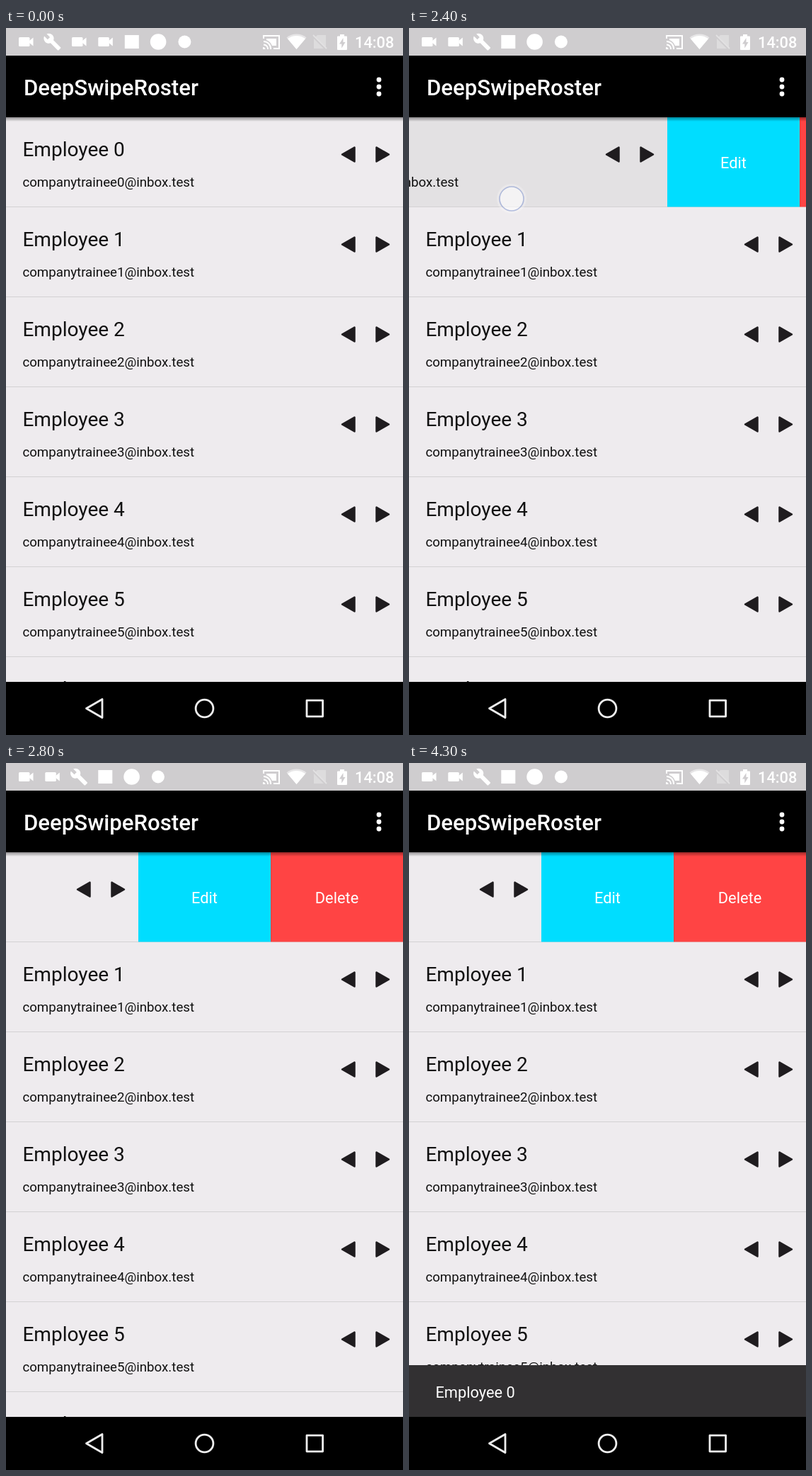
These frames come from a looping animation (561x998 px, 5.1 s). An HTML page:

```html
<!DOCTYPE html>
<html lang="en">
<head>
<meta charset="utf-8">
<title>Swipe list</title>
<style>
  html, body { margin: 0; width: 100%; height: 100%; overflow: hidden; background: #000; }
  svg { display: block; width: 100vw; height: 100vh; font-family: Roboto, sans-serif; }
  .name { font-size: 28.05px; fill: #111; }
  .mail { font-size: 18.7px; fill: #111; }
  .small { font-size: 21.8px; fill: #fff; }
  .mid { text-anchor: middle; }

  /* One 5.1 s loop; poses are held for 0.1 s, as in a 10 fps screen recording. */
  .anim { animation: 5.1s step-end infinite; }
  .early { animation-name: early; }
  .late { animation-name: late; }
  .swipe { animation-name: swipe; }
  .pressed { animation-name: pressed; }
  .drag { animation-name: drag; }
  .tap { animation-name: tap; }
  .snack { animation-name: snack; }

  @keyframes early { 0% { opacity: 1 } 7.843%, 100% { opacity: 0 } }
  @keyframes late { 0% { opacity: 0 } 7.843%, 100% { opacity: 1 } }
  @keyframes swipe {
    0% { transform: translateX(0) }
    43.137% { transform: translateX(-8px) }
    45.098% { transform: translateX(-86px) }
    47.058% { transform: translateX(-196px) }
    49.019% { transform: translateX(-279px) }
    50.98% { transform: translateX(-354px) }
    52.941% { transform: translateX(-372px) }
    54.901%, 100% { transform: translateX(-374px) }
  }
  @keyframes pressed {
    0% { opacity: 0 }
    43.137% { opacity: 1 }
    50.98%, 100% { opacity: 0 }
  }
  @keyframes drag {
    0% { opacity: 0; transform: translate(349px, 222.5px) }
    41.176% { opacity: 1; transform: translate(349px, 222.5px) }
    43.137% { opacity: 1; transform: translate(333px, 223px) }
    45.098% { opacity: 1; transform: translate(255px, 229px) }
    47.058% { opacity: 1; transform: translate(145px, 241px) }
    49.019% { opacity: 1; transform: translate(62px, 253px) }
    50.98% { opacity: .6; transform: translate(62px, 253px) }
    52.941%, 100% { opacity: 0; transform: translate(62px, 253px) }
  }
  @keyframes tap {
    0% { opacity: 0 }
    72.549% { opacity: .95 }
    74.509% { opacity: 1 }
    76.47% { opacity: .5 }
    78.431%, 100% { opacity: 0 }
  }
  @keyframes snack {
    0% { transform: translateY(76px) }
    78.431% { transform: translateY(58px) }
    80.392% { transform: translateY(20px) }
    82.352% { transform: translateY(3px) }
    84.313%, 100% { transform: translateY(0) }
  }
</style>
</head>
<body>
<svg viewBox="0 0 561 998" preserveAspectRatio="none">
  <defs>
    <linearGradient id="shade" x2="0" y2="1">
      <stop stop-opacity=".38"/>
      <stop offset="1" stop-opacity="0"/>
    </linearGradient>
    <g id="camera">
      <rect x="-10" y="-6.5" width="15.5" height="13" rx="1.5"/>
      <path d="M5 -1.5L10.5 -6V6L5 1.5Z"/>
    </g>
    <path id="wrench" transform="translate(-13 -13) scale(1.09)" d="M22.7 19l-9.1-9.1c.9-2.3.4-5-1.5-6.9-2-2-5-2.4-7.4-1.3L9 6 6 9 1.6 4.7C.4 7.1.9 10.1 2.9 12.1c1.9 1.9 4.6 2.4 6.9 1.5l9.1 9.1c.4.4 1 .4 1.4 0l2.3-2.3c.5-.4.5-1.1.1-1.4z"/>
    <g id="notices">
      <rect x="-10" y="-9.5" width="20" height="19"/>
      <circle cx="37.3" r="11.3"/>
      <circle cx="74.6" r="9"/>
    </g>
    <g id="arrows" fill="#1f1c1f" stroke="#1f1c1f" stroke-width="2.5" stroke-linejoin="round">
      <path d="M475 52.5L492.5 42.5V62.5Z"/>
      <path d="M541 52.5L523.5 42.5V62.5Z"/>
    </g>
    <g id="touch">
      <circle r="19" fill="none" stroke="#fff" stroke-opacity=".25" stroke-width="4"/>
      <circle r="17" fill="#fff" fill-opacity=".6" stroke="#788cc8" stroke-opacity=".55" stroke-width="1.6"/>
    </g>
  </defs>

  <rect width="561" height="998" fill="#eeebee"/>
  <g id="list"></g>
  <g class="anim swipe">
    <rect class="anim pressed" y="126" width="561" height="126" fill="#e3e1e3"/>
    <g id="first"></g>
    <rect x="561" y="126" width="187" height="126.5" fill="#00ddff"/>
    <rect x="748" y="126" width="187" height="126.5" fill="#ff4444"/>
    <text class="small mid" x="654.5" y="198">Edit</text>
    <text class="small mid" x="841.5" y="198">Delete</text>
  </g>

  <rect y="126" width="561" height="6" fill="url(#shade)"/>
  <rect y="39" width="561" height="87"/>
  <text x="25" y="95" font-size="31.17" font-weight="500" fill="#fff">DeepSwipeRoster</text>
  <g fill="#fff">
    <circle cx="527" cy="73" r="3.4"/>
    <circle cx="527" cy="83" r="3.4"/>
    <circle cx="527" cy="93" r="3.4"/>
  </g>

  <rect width="561" height="39" fill="#cfcdcf"/>
  <g fill="#fff">
    <use href="#camera" x="28" y="19.5"/>
    <g class="anim early">
      <use href="#wrench" x="65.3" y="19.5"/>
      <use href="#camera" x="103" y="19.5"/>
      <use href="#camera" x="140.3" y="19.5"/>
      <use href="#notices" x="177.8" y="19.5"/>
    </g>
    <g class="anim late">
      <use href="#camera" x="65.3" y="19.5"/>
      <use href="#wrench" x="103" y="19.5"/>
      <use href="#notices" x="140.3" y="19.5"/>
    </g>
    <g fill="none" stroke="#fff" stroke-width="2">
      <path d="M364 15V11H386V29H378M364 19A10 10 0 0 1 374 30M364 23.5A6 6 0 0 1 370 30"/>
    </g>
    <path d="M363 27A3 3 0 0 1 366.5 30H363ZM368 15H382V25H376A14 14 0 0 0 368 17Z"/>
    <path d="M410.5 30L396.5 13.5A22 22 0 0 1 424.5 13.5Z" opacity=".5"/>
    <path d="M410.5 30L398 15.3A20 20 0 0 1 423 15.3Z"/>
    <path d="M440 10H452V29H435V15Z" opacity=".3"/>
    <path d="M433 11L453 31" stroke="#cfcdcf" stroke-width="3"/>
    <path d="M434 10L453 29" stroke="#e2e1e2" stroke-width="1.8"/>
    <path d="M472 9H478V11.5H481Q482 11.5 482 12.5V30Q482 31 481 31H469Q468 31 468 30V12.5Q468 11.5 469 11.5H472Z"/>
    <path d="M476.5 14L471 22.5H474.3V28.5L479.5 20H476.5Z" fill="#cfcdcf"/>
    <text x="493" y="28" font-size="21.8" font-weight="500">14:08</text>
  </g>

  <g class="anim snack">
    <rect y="850" width="561" height="74" fill="#323032"/>
    <text class="small" x="37.4" y="895.5">Employee 0</text>
  </g>
  <rect y="923" width="561" height="75"/>
  <g fill="none" stroke="#eee" stroke-width="2.8" stroke-linejoin="round">
    <path d="M113.5 960.5L136 947.5V973.5Z"/>
    <circle cx="280.5" cy="960.5" r="12.4"/>
    <rect x="425" y="949.2" width="22.6" height="22.6"/>
  </g>

  <use class="anim drag" href="#touch"/>
  <g transform="translate(295.5 205.5)"><use class="anim tap" href="#touch"/></g>
</svg>
<script>
  const rowHeight = 127;
  const rowMarkup = i => `
    <g transform="translate(0 ${126 + i * rowHeight})">
      <text class="name" x="23.4" y="54.5">Employee ${i}</text>
      <text class="mail" x="23.4" y="97.5">companytrainee${i}@inbox.test</text>
      <use href="#arrows"/>
    </g>`;
  const divider = i => `<rect y="${252 + i * rowHeight}" width="561" height="1" fill="#d3d1d3"/>`;

  let list = divider(0);
  for (let i = 1; i < 7; i++) list += rowMarkup(i) + divider(i);
  document.getElementById("list").innerHTML = list;
  document.getElementById("first").innerHTML = rowMarkup(0);
</script>
</body>
</html>
```
